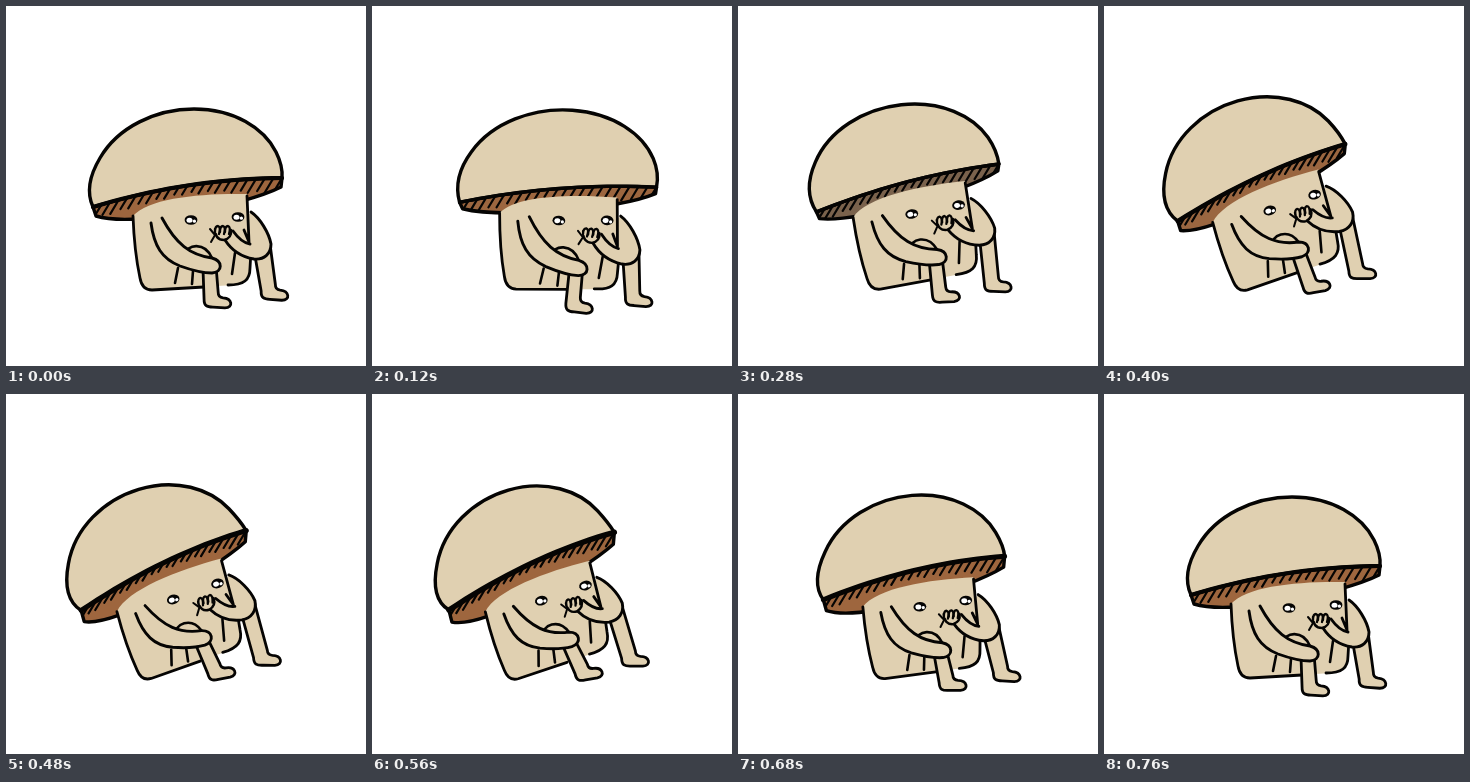
Recreate the animation shown at these times as an HTML page with a canvas. Size 360 px wide and 360 px high, loop 0.8 s.

```html
<!DOCTYPE html>
<html lang="en">
<head>
<meta charset="utf-8">
<title>Sad mushroom</title>
<style>
html, body { margin: 0; width: 100%; height: 100%; overflow: hidden; background: #fff; }
canvas { display: block; width: 360px; height: 360px; }
</style>
</head>
<body>
<canvas id="stage" width="360" height="360"></canvas>
<script>
const ctx = document.getElementById('stage').getContext('2d');
const SKIN = '#e0d0b1', INK = '#050403';
const LOOP = 800, STEP = 40, SWING = 760;

// resting place, travel at full lean, travel at full drift
const JOINTS = {
  capL: [[90, 210], [-14, 14], [3, 5]],
  capR: [[275, 181], [-35, -34], [-1, 1]],
  crown: [[172, 103], [-54, -4], [0, 1]],
  base: [[145, 284], [-3, 0], [3, 1]],
  eyeL: [[185, 214], [-20, -10], [3, 2]],
  eyeR: [[232, 211], [-22, -23], [2, 2]],
  footL: [[198, 297], [1, -12], [5, -2]],
  footR: [[255, 289], [-11, -20], [5, -2]]
};

const ease = (t, from, to) => {
  const u = Math.min(1, Math.max(0, (t - from) / (to - from)));
  return (1 - Math.cos(Math.PI * u)) / 2;
};
// Small wind-up to the right, a swing to the left, then back
const leanAt = t => -.22 * ease(t, 0, 120) + 1.22 * ease(t, 120, 420) - ease(t, 520, SWING);
const driftAt = t => -Math.sin(2 * Math.PI * t / SWING);

const pose = (lean, drift) => Object.fromEntries(Object.entries(JOINTS).map(
  ([name, [rest, a, b]]) => [name, rest.map((v, i) => v + a[i] * lean + b[i] * drift)]));

// Affine map carrying a resting triangle of joints to its posed one
const triangle = ([ax, ay], [bx, by], [cx, cy]) =>
  new DOMMatrix([bx - ax, by - ay, cx - ax, cy - ay, ax, ay]);
const REST = pose(0, 0);
const warp = (p, ...names) => triangle(...names.map(n => p[n]))
  .multiply(triangle(...names.map(n => REST[n])).inverse());

const place = (m, x, y) => m.transformPoint(new DOMPoint(x, y));
const put = (m, x, y) => { const q = place(m, x, y); return `${q.x} ${q.y} `; };

function draw(path, fill, width = 0, m = new DOMMatrix()) {
  const p = new Path2D();
  p.addPath(new Path2D(path), m);
  if (fill) { ctx.fillStyle = fill; ctx.fill(p); }
  if (width) { ctx.lineWidth = width; ctx.stroke(p); }
}

function dot(m, x, y, rx, ry, fill) {
  const q = place(m, x, y);
  ctx.fillStyle = fill;
  ctx.beginPath();
  ctx.ellipse(q.x, q.y, rx, ry, Math.atan2(m.b, m.a), 0, 7);
  ctx.fill();
}

function eye(m, [x, y]) {
  dot(m, x, y, 6.4, 4.8, INK);
  dot(m, x - 1.5, y + .2, 3, 2.5, '#fff');
  dot(m, x + 3.4, y + 1.2, 1.6, 1.6, '#fff');
}

function leg(m, back, front, [x, y], angle) {
  const f = new DOMMatrix().translate(x, y).rotate(angle);
  draw('M' + put(m, ...back) + 'L' + put(f, 0, -4) +
    'C' + put(f, 0, 3) + put(f, 3, 4) + put(f, 9, 4) + 'L' + put(f, 21, 4.5) +
    'C' + put(f, 30, 4) + put(f, 28, -5) + put(f, 19, -5.5) +
    'Q' + put(f, 14, -6) + put(f, 14, -11) + 'L' + put(m, ...front), SKIN, 2.8);
}

// Points along the rim: the chord between the cap's ends, lifted and bowed
function rimOf(p, drift) {
  const [ax, ay] = p.capL, [bx, by] = p.capR;
  const gap = 9 + 3 * drift, bow = 2 * (7 + drift);
  return s => [ax - 3 + (bx - ax + 4) * s,
    ay - gap + (by - ay) * s - 2 * bow * s * (1 - s)];
}

function underside(p, rim, drift, dull) {
  const [ax, ay] = p.capL, [bx, by] = p.capR, w = bx - ax, h = by - ay;
  const brown = [158, 102, 62].map((v, i) => v + ([122, 98, 76][i] - v) * dull);
  const edge = [];
  for (let s = 0; s <= 1.001; s += .05) edge.push(rim(s).join(' '));
  const lens = `M${edge.join('L')}L${bx} ${by}C${bx - w * .2} ${by - h * .2 + 13} ` +
    `${ax + w * .2} ${ay + h * .2 + 17 + 5 * drift} ${ax} ${ay}Z`;
  draw(lens, `rgb(${brown})`);
  ctx.save();
  ctx.clip(new Path2D(lens));
  const n = 22;
  let gills = '';
  for (let i = 0; i <= n; i++) {
    const [x, y] = rim(i / n), len = 7 + 7 * Math.abs(1 - 2 * i / n) + i % 2 * 2;
    gills += `M${x} ${y}l${-len * .6} ${len}`;
  }
  draw(gills, null, 2.2);
  ctx.restore();
  draw(lens, null, 3.4);
  return edge;
}

function render(t) {
  const lean = leanAt(t), drift = driftAt(t), p = pose(lean, drift);
  const cap = warp(p, 'capL', 'capR', 'crown'), body = warp(p, 'base', 'eyeL', 'eyeR');
  const part = (path, fill, width) => draw(path, fill, width, body);
  ctx.fillStyle = '#fff';
  ctx.fillRect(0, 0, 360, 360);
  ctx.strokeStyle = INK;
  ctx.lineCap = ctx.lineJoin = 'round';

  const rim = rimOf(p, drift);
  const edge = underside(p, rim, drift, Math.exp(-(((t - 270) / 90) ** 2)));

  // stem
  const side = 'M127 210C128 238 131 258 134 272Q136 284 146 284';
  part(side + 'L228 279Q244 278 244 264L241 188C195 187 142 192 127 210Z', SKIN);
  part(side + 'L198 281M222 279C238 279 244 274 244 262L245 245', null, 2.8);

  // cap
  draw('M' + edge[0] + 'C' + put(cap, 81, 188) + put(cap, 82, 172) + put(cap, 94, 152) +
    'C' + put(cap, 112, 121) + put(cap, 150, 103) + put(cap, 188, 103) +
    'C' + put(cap, 228, 103) + put(cap, 258, 122) + put(cap, 270, 146) +
    'Q' + put(cap, 277, 160) + edge.slice().reverse().join('L') + 'Z', SKIN, 3.4);
  draw('M' + edge.join('L'), null, 4.2 + 1.2 * drift);

  // legs and folds
  part('M172 262L169 277M187 265L186 278M229 247L226 268', null, 2.6);
  leg(body, [249, 250], [264, 238], p.footR, 2 - 4 * lean);
  leg(body, [197, 263], [210, 260], p.footL, 1 - 14 * lean);
  part('M178 250C181 237 199 236 206 252', SKIN, 2.6);

  // left arm
  part('M145 217C148 240 156 253 174 260C188 265 198 267 206 267C217 266 217 255 206 252' +
    'C184 249 170 238 156 212', SKIN, 2.9);

  // right arm
  part('M245 206C254 212 263 227 265 238C265 248 258 254 248 253C236 251 226 245 219 234', SKIN, 2.9);
  part('M227 225C232 232 237 237 244 238', null, 2.9);
  part('M241 190L243 236L238 224', null, 2.8);

  eye(body, REST.eyeL);
  eye(body, REST.eyeR);

  // fist and mouth
  part('M209 223Q209 234 218 234Q226 232 225 224Z', SKIN, 2.4);
  for (const x of [211, 216, 221])
    part(`M${x - 2} 226Q${x - 2} 220 ${x + 1} 220Q${x + 4} 221 ${x + 2} 228`, SKIN, 2.3);
  part('M204 223L209 229L205 236', null, 2);
}

function tick(now) {
  render(Math.floor(now % LOOP / STEP) * STEP);
  requestAnimationFrame(tick);
}
render(0);
requestAnimationFrame(tick);
</script>
</body>
</html>
```
